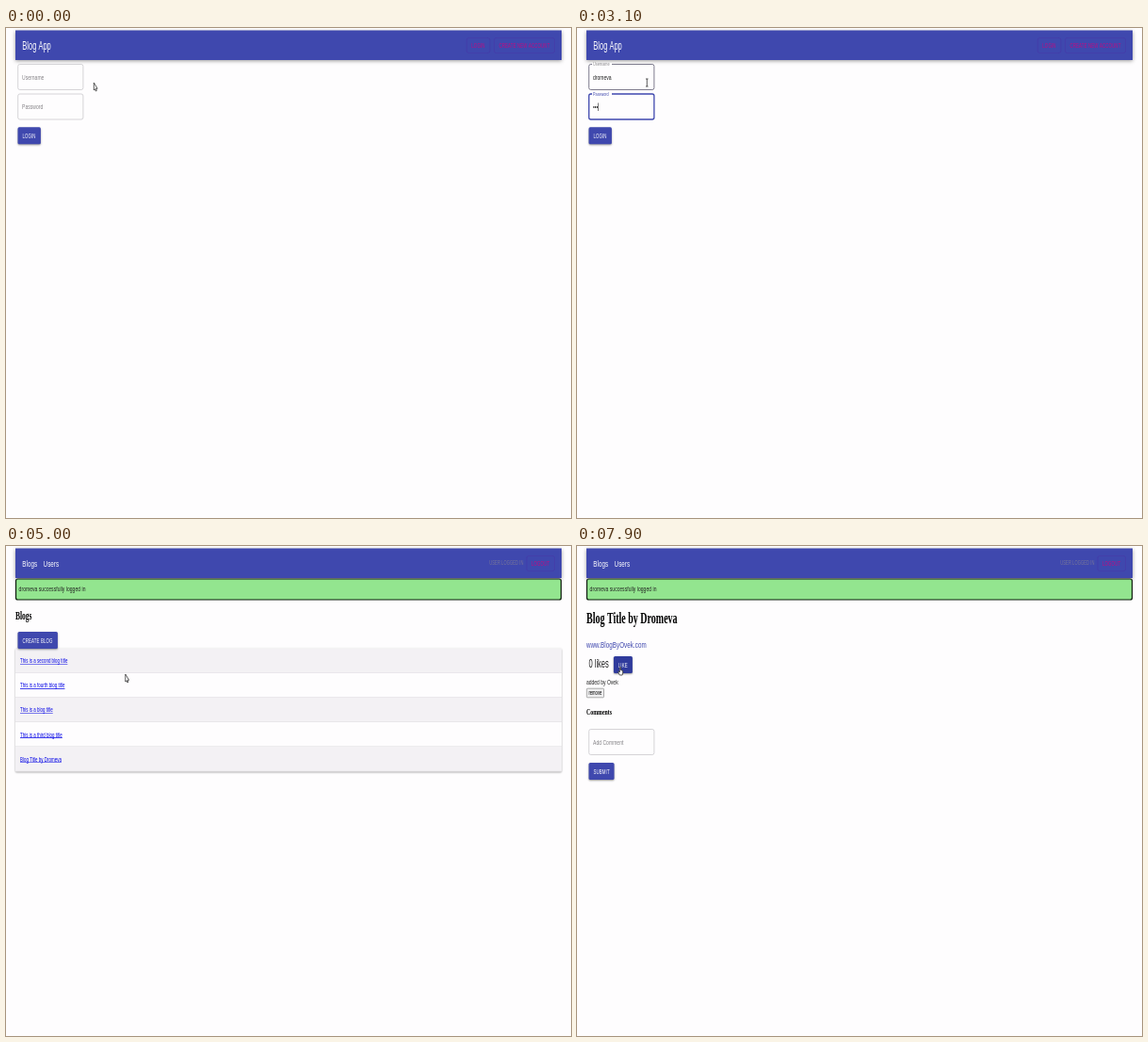
An HTML page with a canvas that plays this animation: 600x520 px, repeating every 8000 ms.

```html
<!DOCTYPE html>
<html lang="en">
<head>
<meta charset="utf-8">
<title>Blog App</title>
<style>
html, body { margin: 0; width: 600px; height: 520px; overflow: hidden; background: #fefdfe; }
canvas { display: block; }
</style>
</head>
<body>
<canvas id="stage" width="600" height="520"></canvas>
<script>
const ctx = document.getElementById('stage').getContext('2d');
const LOOP = 8000, STEP = 100;
const SX = 0.3125, SY = 0.494; // the whole page is shown squeezed
const SANS = '"Liberation Sans", Arial, sans-serif';
const SERIF = '"Liberation Serif", "Times New Roman", serif';
const BLUE = '#3f48ae', PINK = '#c00c80', GREY = '#858387', INK = '#222';
const USER = 'dromeva';
const LOGIN_AT = 3800, LIST_AT = 4400, POST_AT = 6400;
const LINKS = ['This is a second blog title', 'This is a fourth blog title',
  'This is a blog title', 'This is a third blog title', 'Blog Title by Dromeva'];
const ROW_TOP = 108.5, ROW_H = 26.15;

// time, x, y of the pointer
const PATH = [
  [0, 93, 58], [300, 74, 58], [4700, 74, 58], [5000, 126.5, 136], [5300, 60, 142],
  [5400, 25, 141], [5600, 40, 122], [5700, 42, 145], [6000, 44, 205], [6100, 45, 220],
  [6400, 45, 220], [7000, 14, 232], [7100, 14, 232], [7200, 14, 146], [7300, 14, 146],
  [7400, 23, 231], [7600, 48, 180], [7800, 45, 128], [8000, 45, 128]
];

const clamp = v => Math.max(0, Math.min(1, v));
const ease = v => 1 - (1 - clamp(v)) ** 3;
const mix = (a, b, p) => a + (b - a) * p;

function pointerAt(t) {
  const i = PATH.findIndex(k => k[0] > t);
  const [t0, x0, y0] = PATH[i - 1], [t1, x1, y1] = PATH[i];
  const p = (t - t0) / (t1 - t0);
  return { x: mix(x0, x1, p), y: mix(y0, y1, p) };
}

// Draws text with its baseline at x, y and returns its width on the stage
function text(str, x, y, size, color = INK, spacing = 0, family = SANS, weight = '') {
  ctx.save();
  ctx.translate(x, y);
  ctx.scale(SX, SY);
  ctx.font = `${weight} ${size}px ${family}`;
  ctx.letterSpacing = spacing * size + 'px';
  ctx.fillStyle = color;
  ctx.fillText(str, 0, 0);
  const w = ctx.measureText(str).width * SX;
  ctx.restore();
  return w;
}

function rect(x, y, w, h, fill, r = 0) {
  ctx.fillStyle = fill;
  ctx.beginPath();
  ctx.roundRect(x, y, w, h, r);
  ctx.fill();
}

function outline(x, y, w, h, color, width, r = 2) {
  ctx.strokeStyle = color;
  ctx.lineWidth = width;
  ctx.beginPath();
  ctx.roundRect(x, y, w, h, r);
  ctx.stroke();
}

function raised(x, y, w, h, fill, r, blur) {
  ctx.save();
  ctx.shadowColor = 'rgba(0,0,0,.4)';
  ctx.shadowBlur = blur;
  ctx.shadowOffsetY = 1;
  rect(x, y, w, h, fill, r);
  ctx.restore();
}

function button(label, x, y, w, hover) {
  raised(x, y, w, 18, hover ? '#303b9c' : BLUE, 1.6, 2);
  text(label, x + 4.9, y + 11.6, 14, '#fff', 0.0286);
}

function field(label, y, { value = '', float = 0, focus = false, hover = false } = {}) {
  const color = focus ? BLUE : hover ? '#5d5b70' : '#cbc9cd';
  outline(12.7, y + 0.5, 69.2, 27, color, focus ? 1.3 : 0.8);
  if (float > 0) rect(16, y - 1, 21 * float, 3, '#fefdfe');
  text(label, 17, mix(y + 16.5, y + 2, float), mix(16, 12, float), focus ? BLUE : GREY, 0.009);
  const w = value ? text(value, 17, y + 16.5, 16) : 0;
  if (focus && float > 0.4) rect(17 + w, y + 10, 0.6, 8.5, '#222');
}

function navButton(label, x, w) {
  outline(x, 10.5, w, 16, 'rgba(90,20,150,.25)', 0.7);
  text(label, x + 5, 21, 14, PINK, 0.0286);
}

function bar(loggedIn) {
  raised(10, 2.5, 580, 31.5, BLUE, 0, 4);
  if (loggedIn) {
    text('Blogs', 17.3, 22, 20, '#fff', 0.0075);
    text('Users', 39.6, 22, 20, '#fff', 0.0075);
    text('USER LOGGED IN', 513.3, 20.3, 13, '#777599', 0.02);
    navButton('LOGOUT', 553, 29.5);
  } else {
    text('Blog App', 17.3, 22.5, 24, '#fff');
    navButton('LOGIN', 489.3, 24.5);
    navButton('CREATE NEW ACCOUNT', 518.5, 64);
  }
}

function notice() {
  rect(10.5, 35, 579, 22, '#93e58f', 2);
  outline(10.5, 35, 579, 22, '#0b1a0b', 1.2);
  text(USER + ' successfully logged in', 13.6, 48.2, 16, INK, 0.0094);
}

function loginPage(t, p) {
  const sent = t >= LOGIN_AT;
  const onPassword = t >= 2300;
  const typed = clamp((t - 1400) / 700) * 7;
  const dots = t < 2700 ? 0 : Math.min(8, Math.floor((t - 2700) / 200) + 1 + Math.max(0, Math.floor((t - 3100) / 200)));
  field('Username', 38, {
    value: sent ? '' : USER.slice(0, Math.floor(typed + 0.01)),
    float: sent ? 1 - ease((t - LOGIN_AT + STEP) / 250) : ease((t - 400) / 250),
    focus: t >= 500 && !onPassword,
    hover: p.x < 82
  });
  field('Password', 69.5, {
    value: sent ? '' : '•'.repeat(dots),
    float: ease((t - 2200) / 250),
    focus: onPassword
  });
  button('LOGIN', 12.5, 105.3, 24.4);
}

function listPage() {
  text('Blogs', 10, 78.2, 24, '#000', 0, SERIF, 'bold');
  raised(10, ROW_TOP, 580, ROW_H * 5, '#fefdfe', 1, 2);
  LINKS.forEach((title, i) => {
    const y = ROW_TOP + i * ROW_H;
    if (i % 2 === 0) rect(10, y, 580, ROW_H, '#f3f1f4');
    rect(10, y + ROW_H - 0.5, 580, 0.6, '#dedce0');
    const w = text(title, 15, y + 15.6, 14, '#0000e6', 0.0107);
    rect(15, y + 16.4, w, 0.6, '#0000e6');
  });
  button('CREATE BLOG', 12.5, 91, 42.4);
}

function postPage(p) {
  text(LINKS[4], 10, 82, 32, '#000', 0, SERIF, 'bold');
  text('www.BlogByOvek.com', 10, 108.3, 20, BLUE, 0.0075);
  text('0 likes', 12.5, 129, 24);
  button('LIKE', 38.9, 117, 20, overLike(p));
  text('added by Ovek', 10, 147.2, 16);
  rect(10.3, 151.2, 18.2, 9.6, '#efeff0', 1);
  outline(10.3, 151.2, 18.2, 9.6, '#767676', 0.6, 1);
  text('remove', 12.4, 158.2, 13.33, '#000');
  text('Comments', 10, 178.6, 18.72, '#000', 0, SERIF, 'bold');
  field('Add Comment', 194, { hover: inside(p, 12, 194, 70, 28) });
  button('SUBMIT', 12.5, 230, 27, inside(p, 12.5, 230, 27, 18));
}

const inside = (p, x, y, w, h) => p.x >= x && p.x <= x + w && p.y >= y && p.y <= y + h;
const overLike = p => inside(p, 38.9, 117, 20, 18);

function pointerKind(t, p) {
  if (t < LIST_AT) return p.x < 82 ? 'beam' : 'arrow';
  if (t < POST_AT)
    return LINKS.some((_, i) => inside(p, 15, ROW_TOP + i * ROW_H + 9, 45, 8)) ? 'hand' : 'arrow';
  if (inside(p, 12, 194, 70, 28)) return 'beam';
  return overLike(p) || inside(p, 12.5, 230, 27, 18) ? 'hand' : 'arrow';
}

const SHAPES = {
  arrow: new Path2D('M0 0V8L1.2 6.8L2.1 9L3 8.5L2.2 6.3H3.8Z'),
  hand: new Path2D('M0 0.5Q.6-.4 1.1 .5V3.5L3.4 4.5V7L2.8 9H.1L-1.6 5.8L-1 5L0 6Z'),
  beam: new Path2D('M-1.3-4H1.3M-1.3 4H1.3M0-4V4')
};

function pointer(t, p) {
  const kind = pointerKind(t, p);
  ctx.save();
  ctx.translate(p.x + 0.3, p.y);
  ctx.strokeStyle = '#333';
  ctx.lineWidth = 0.8;
  if (kind !== 'beam') {
    ctx.fillStyle = '#fff';
    ctx.fill(SHAPES[kind]);
  }
  ctx.stroke(SHAPES[kind]);
  ctx.restore();
}

function draw(now) {
  const t = Math.floor(now % LOOP / STEP) * STEP;
  const p = pointerAt(t);
  const loggedIn = t >= LIST_AT;
  rect(0, 0, 600, 520, '#fefdfe');
  bar(loggedIn);
  if (loggedIn) notice();
  if (!loggedIn) loginPage(t, p);
  else if (t < POST_AT) listPage();
  else postPage(p);
  pointer(t, p);
}

const start = performance.now();
function tick() {
  draw(performance.now() - start);
  requestAnimationFrame(tick);
}
tick();
</script>
</body>
</html>
```
